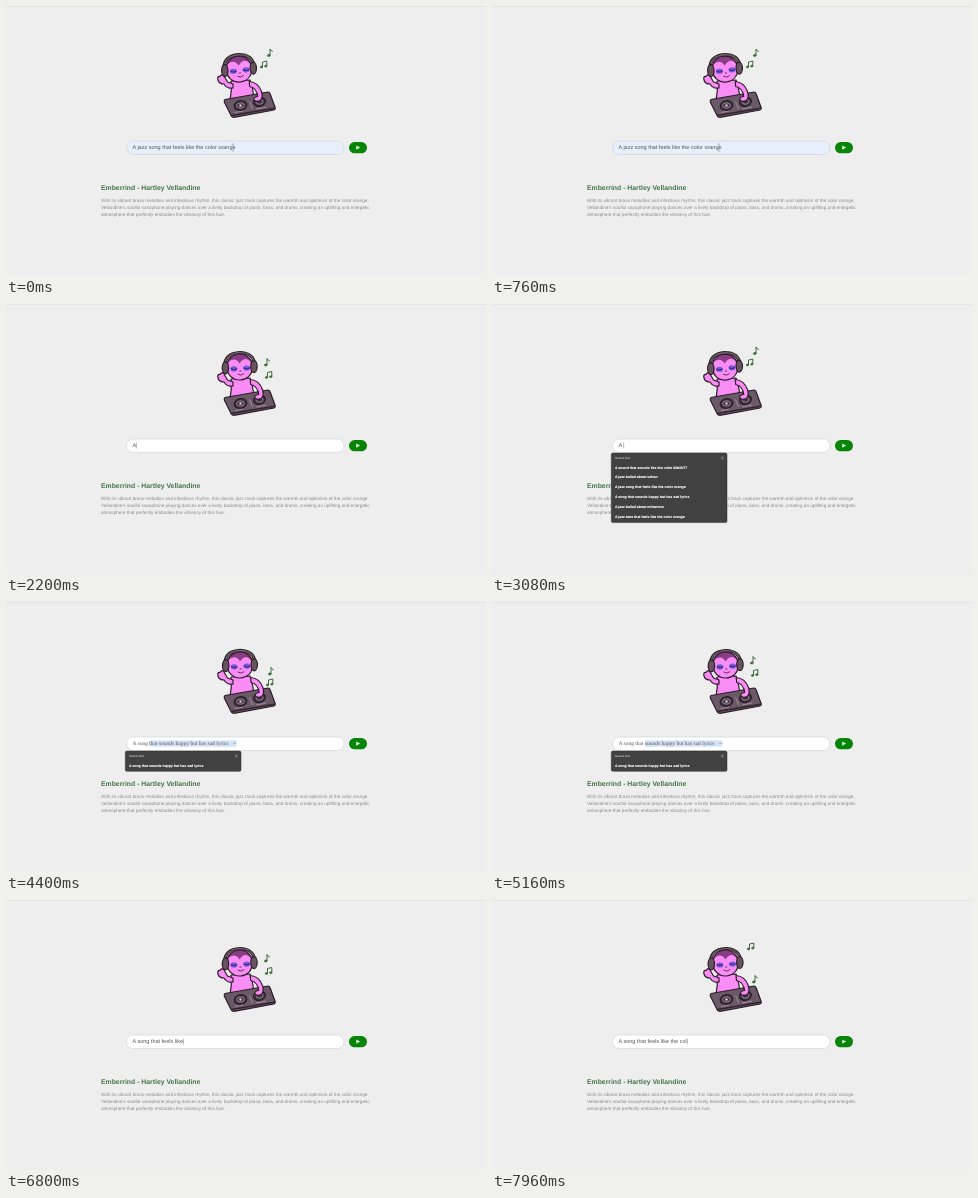
Animation of 480 by 270 pixels, one loop 8 s. Source, as an HTML page:

```html
<!DOCTYPE html>
<html lang="en">
<head>
<meta charset="utf-8">
<title>Song finder</title>
<style>
  html, body { margin: 0; width: 100%; height: 100%; overflow: hidden; background: #eee; }
  svg { display: block; width: 100vw; height: 100vh; }
  text { font-family: "Liberation Sans", Arial, sans-serif; text-rendering: geometricPrecision; white-space: pre; }
  .title { font-size: 6.85px; font-weight: 700; fill: #437548; }
  .body { font-size: 4.65px; fill: #8a8a8a; }
  .query { font-size: 5.51px; fill: #555; }
  .query.preview { font-family: "Liberation Serif", Times, serif; }
  .menu { font-size: 3.5px; font-weight: 700; fill: #fff; stroke: #fff; stroke-width: .12; }
  .menu .head { font-size: 3px; fill: #c4c4c4; stroke: none; }
  .ink { stroke: #2b1b29; stroke-width: 1.2; stroke-linejoin: round; stroke-linecap: round; }
  .pink { fill: #f98df5; }
  .note { fill: none; stroke: #2a5c2a; stroke-width: .9; stroke-linejoin: round; }
  .note ellipse { fill: #2f7a2f; stroke-width: .6; }
</style>
</head>
<body>
<svg viewBox="0 0 480 270" preserveAspectRatio="none">
  <rect width="480" height="270" fill="#eee"/>
  <rect width="480" height="1" fill="#e4e4e4"/>

  <g id="monkey">
    <path class="ink pink" d="M225 75Q226 85 224 95L248 92Q247 82 244 74Z"/>
    <path class="ink pink" d="M227 82Q221 83 218 78Q213 78 212 74Q211 70 214 70.500Q216 67 218 70L221.500 76L227 78Z"/>
    <g id="head">
      <ellipse class="ink" cx="233.500" cy="63" rx="13" ry="13" fill="#8a3c86"/>
      <path class="pink" d="M221.500 64Q221 56 227.500 55.500Q231 55.500 233.500 59.500Q236 55 240 55Q245.500 56 245.500 63.500Q245 74.500 234 75.500Q223 75 221.500 64Z"/>
      <path d="M218.500 62Q218.500 49.500 233.500 48.500Q248 49 248.500 61" fill="none" stroke="#2d2229" stroke-width="3.200"/>
      <path d="M219 59Q220.500 49.500 233.500 48.500Q246.500 49 248 58" fill="none" stroke="#75656d" stroke-width="1.200"/>
      <ellipse class="ink" cx="219.300" cy="64" rx="3.200" ry="6" fill="#66545f"/>
      <ellipse class="ink" cx="247.800" cy="62.500" rx="3.200" ry="6" fill="#66545f"/>
      <ellipse cx="227.800" cy="65" rx="3.400" ry="2.600" fill="#7658dc"/>
      <ellipse cx="240.500" cy="64" rx="3.400" ry="2.600" fill="#7658dc"/>
      <path d="M225 64.500Q228 67 231 64.500M237.500 63.500Q240.500 66 243.500 63.500" fill="none" stroke="#36236f"/>
      <path d="M233.300 67h2M231.500 70Q235 72.500 238 69.500" fill="none" stroke="#55264f" stroke-width=".9"/>
    </g>
    <path class="ink" d="M219 93.500L262 86Q263.500 86 264 87.500L269.300 102Q269.300 103.500 268 104L228 111.300Q226 111.300 225.300 110L218.300 96Q218 94 219 93.500Z" fill="#6a5967"/>
    <path d="M225.500 109.500L268.500 102.200" stroke="#33232f" stroke-width="1.500"/>
    <g class="ink" fill="#403641">
      <ellipse cx="234.500" cy="99.500" rx="6.400" ry="4.700" transform="rotate(-14 234.500 99.500)"/>
      <ellipse cx="253.500" cy="95.800" rx="6" ry="4.500" transform="rotate(-14 253.500 95.800)"/>
    </g>
    <g fill="none" stroke="#b7a3b4" stroke-width=".7">
      <ellipse cx="234.500" cy="99.500" rx="3.800" ry="2.600"/>
      <ellipse cx="253.500" cy="95.800" rx="3.500" ry="2.400"/>
      <path d="M243.500 95.500l3 7.500M229 106.500l8-1.500M250 103l10-1.800"/>
    </g>
    <circle cx="234.500" cy="99.500" r="1.200" fill="#e0bddd"/>
    <path id="arm" class="ink pink" d="M244 75.500Q253 76 256.500 86Q258 92 255 94.500Q250 96.500 248.500 93.500Q248.500 91 252.500 90.500Q251.500 82 244.500 80.500Z"/>
  </g>

  <g id="single" class="note">
    <path d="M1 3V-3.500Q2 -1.500 3.800-1"/><ellipse cx="-.2" cy="3" rx="1.400" ry="1.100"/>
  </g>
  <g id="beamed" class="note">
    <path d="M-1.500 3V-2L2.800-3V2"/><ellipse cx="-2.500" cy="3" rx="1.200" ry=".9"/><ellipse cx="1.800" cy="2.200" rx="1.200" ry=".9"/>
  </g>

  <rect id="field" x="120.500" y="135" width="217.500" height="13.500" rx="6.700" stroke-width=".6"/>
  <rect id="mark" y="138.300" height="6.500"/>
  <text id="query" class="query" x="126.500" y="143.400"></text>
  <rect id="caret" y="138.600" width=".5" height="5.800" fill="#777"/>
  <path id="chip" d="M227.200 141.400h3" fill="none" stroke="#8f9aa8" stroke-width=".7"/>
  <path id="pointer" d="M-1.300-3.500h2.600M0-3.500v7M-1.300 3.500h2.600" fill="none" stroke="#888" stroke-width=".5"/>
  <rect x="343" y="136" width="18" height="11.300" rx="5.600" fill="#088408"/>
  <path d="M350.200 139.500L354.200 141.600L350.200 143.800Z" fill="#d5ecd5"/>

  <text class="title" x="95" y="184.300">Emberrind - Hartley Vellandine</text>
  <g class="body">
    <text x="95" y="195.600">With its vibrant brass melodies and infectious rhythm, this classic jazz track captures the warmth and optimism of the color orange.</text>
    <text x="95" y="202.600">Vellandine's soulful saxophone playing dances over a lively backdrop of piano, bass, and drums, creating an uplifting and energetic</text>
    <text x="95" y="209.600">atmosphere that perfectly embodies the vibrancy of this hue.</text>
  </g>

  <g id="menu" class="menu">
    <rect id="panel" x="119.300" y="149" width="115.700" fill="#414141" stroke="#2e2e2e" stroke-width=".5" rx="1.500"/>
    <text class="head" x="123" y="155.200">Saved text</text>
    <path d="M229.300 153l2.200 2.200m0-2.200l-2.200 2.200" stroke="#ccc" stroke-width=".6"/>
    <g id="items"></g>
  </g>
</svg>
<script>
const LOOP = 8000;
const $ = id => document.getElementById(id);
const show = (el, on) => el.setAttribute("visibility", on ? "visible" : "hidden");
const setAll = (el, attrs) => { for (const k in attrs) el.setAttribute(k, attrs[k]); };

const first = "A jazz song that feels like the color orange";
const happy = "A song that sounds happy but has sad lyrics";
const ideas = [
  "A sound that sounds like the color #0b0b77",
  "A jazz ballad about velour",
  first,
  happy,
  "A jazz ballad about milestone",
  "A jazz tune that feels like the color orange"
];

// Typing runs: start, ms per key, keys
const runs = [
  [2200, 100, "A"], [2840, 100, " "], [3280, 270, "so"], [3800, 200, "ng"],
  [4300, 145, " that "], [5280, 150, "feels like"], [6880, 140, " the col"]
];
const typedAt = t => runs.map(([start, step, keys]) =>
  keys.slice(0, Math.max(0, Math.floor((t - start) / step) + 1))).join("");

const DRAG_START = 920, DRAG_END = 1300, CLEAR = 2200, OPEN = 2320, CLOSE = 5280, PREVIEW = 3800;
const LEFT = 126.5, ROW = 9.85;

// Dance poses: end time in the beat, single note, beamed note, head tilt
const BEAT = 757;
const poses = [
  [215, [263, 46.5], [258, 58], -2],
  [420, [262, 79], [259, 46], 0],
  [617, [264, 69], [264, 80], 1.5],
  [757, [260, 58], [263, 70.5], 0.5]
];

let shownMenu = "";
function drawMenu(list) {
  const key = list.join();
  if (key === shownMenu) return;
  shownMenu = key;
  $("panel").setAttribute("height", 10.5 + ROW * list.length);
  $("items").innerHTML = list.map((s, i) =>
    `<text x="123" y="${164.6 + ROW * i}">${s}</text>`).join("");
}

function drawDancer(t) {
  const [, single, beamed, tilt] = poses.find(p => t % BEAT < p[0]);
  $("single").setAttribute("transform", `translate(${single})`);
  $("beamed").setAttribute("transform", `translate(${beamed})`);
  $("head").setAttribute("transform", `rotate(${tilt} 235 78)`);
  $("arm").setAttribute("transform", `translate(${tilt * 0.4} 0)`);
}

function drawField(t) {
  const query = $("query");
  const filled = t < CLEAR, preview = t >= PREVIEW && t < CLOSE;
  const typed = typedAt(t);
  const content = filled ? first : preview ? happy : typed;
  query.classList.toggle("preview", preview);
  if (query.textContent !== content) query.textContent = content;

  const end = LEFT + query.getComputedTextLength();
  const drag = Math.min(1, Math.max(0, (t - DRAG_START) / (DRAG_END - DRAG_START)));
  const selecting = filled && drag > 0;
  const from = preview ? LEFT + query.getSubStringLength(0, typed.length) : end - (end - LEFT) * drag;
  setAll($("field"), {
    fill: filled ? "#e6effb" : "#fff",
    stroke: selecting ? "#a9bdcc" : "#cfd2d6"
  });
  show($("mark"), selecting || preview);
  setAll($("mark"), {
    x: from, width: Math.max(0, end - from + (preview ? 8 : 0)),
    fill: preview ? "#d5e3f7" : "#a9c9ee"
  });
  show($("caret"), !filled && !preview);
  $("caret").setAttribute("x", end + 0.2);
  show($("chip"), preview);
  show($("pointer"), t < DRAG_END);
  $("pointer").setAttribute("transform", `translate(${227 - 100 * drag} 141.5)`);

  const open = t >= OPEN && t < CLOSE;
  show($("menu"), open);
  if (open) drawMenu(ideas.filter(s => s.startsWith(typed)));
}

const start = performance.now();
function frame(now) {
  const t = Math.max(0, now - start) % LOOP;
  drawDancer(t);
  drawField(t);
  requestAnimationFrame(frame);
}
frame(start);
</script>
</body>
</html>
```
